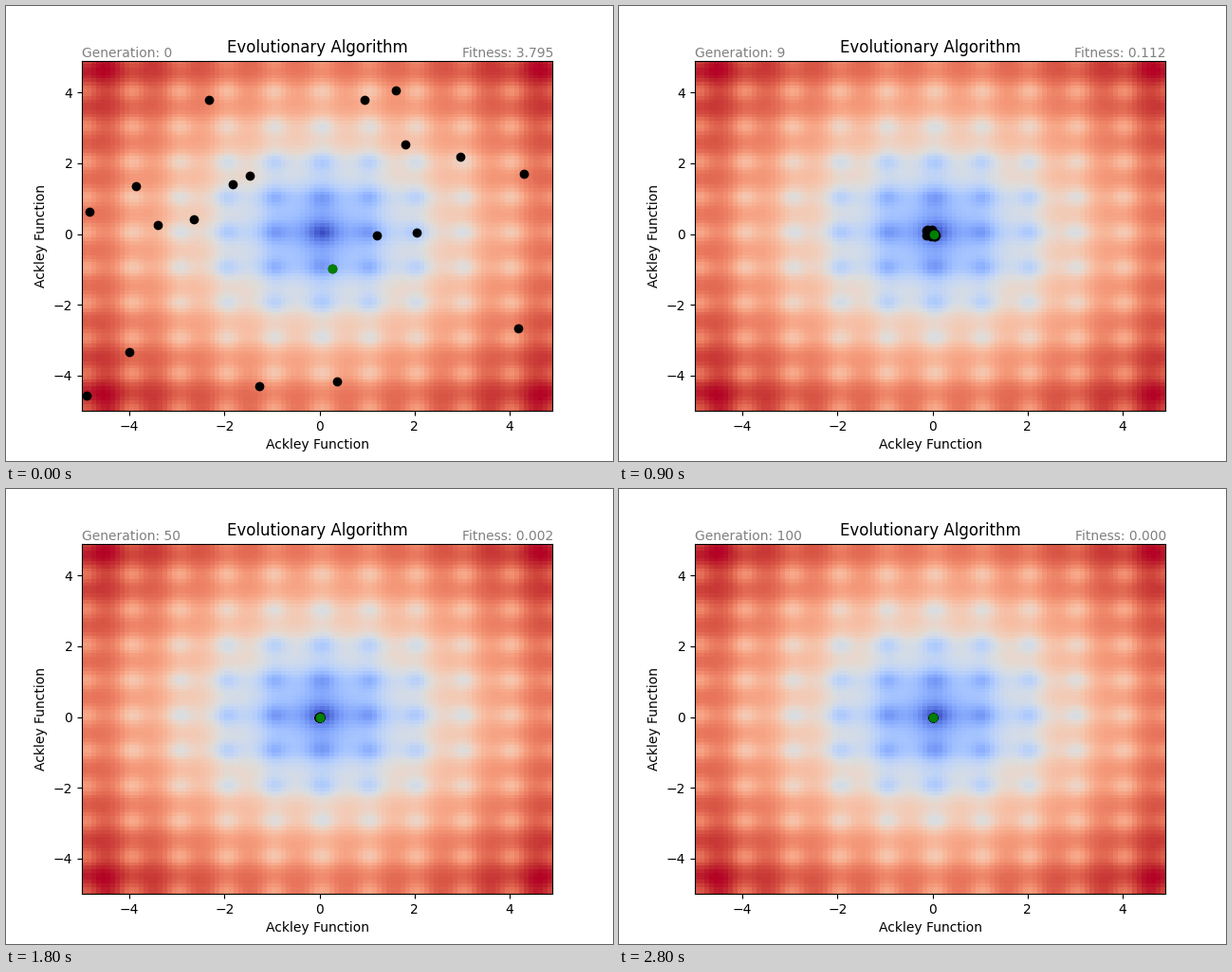
Write a matplotlib script that moves like this. It is 640 px wide and 480 px high and loops after 2900 ms.

```python
import numpy as np
import matplotlib.pyplot as plt
from matplotlib.animation import FuncAnimation

FRAMES = 29
LOW, HIGH = -5, 4.9

# Scattered first population; the last point is the fittest.
START = np.array([
    (-2.32, 3.79), (0.95, 3.79), (1.61, 4.05), (1.81, 2.53), (2.97, 2.18),
    (4.31, 1.70), (-4.84, 0.63), (-3.86, 1.35), (-3.40, 0.25), (-2.64, 0.41),
    (-1.82, 1.41), (-1.46, 1.65), (1.21, -0.04), (2.05, 0.04), (-4.00, -3.34),
    (-4.90, -4.57), (-1.26, -4.30), (0.37, -4.17), (4.19, -2.67), (0.27, -0.98),
])


def ackley(x, y):
    dist = np.sqrt(0.5 * (x**2 + y**2))
    waves = 0.5 * (np.cos(2 * np.pi * x) + np.cos(2 * np.pi * y))
    return 20 - 20 * np.exp(-0.2 * dist) + np.e - np.exp(waves)


def generation(frame):
    """Every generation up to 10, then every fifth one."""
    return frame if frame < 10 else 10 + 5 * (frame - 10)


def best_fitness(gen):
    """Falls exponentially, at a rate that changes at a few key points."""
    gens = [0, 3, 9, 35, 60, 100]
    values = [3.795, 0.428, 0.112, 0.005, 0.001, 0.0001]
    return np.exp(np.interp(gen, gens, np.log(values)))


def population(gen):
    """A cloud that closes in on the minimum as the fitness improves."""
    if gen == 0:
        return START
    fitness = best_fitness(gen)
    rng = np.random.default_rng(gen)
    noise = np.clip(rng.normal(size=START.shape), -1.8, 1.8)
    points = 0.6 * fitness * noise
    if gen <= 3:
        points[0] = START[-1]  # the first winner survives for a while
    angle = np.pi * (gen - 9) / 7
    points[-1] = fitness / 4 * np.array([np.cos(angle), np.sin(angle)])
    return points


fig, ax = plt.subplots(figsize=(6.4, 4.8), dpi=100)
axis = np.linspace(LOW, HIGH, 100)
X, Y = np.meshgrid(axis, axis)
Z = ackley(X, Y)
ax.pcolormesh(X, Y, Z[:-1, :-1], cmap="coolwarm", shading="flat",
              vmin=Z.min(), vmax=Z.max())
ax.set(xlim=(LOW, HIGH), ylim=(LOW, HIGH), title="Evolutionary Algorithm",
       xlabel="Ackley Function", ylabel="Ackley Function")

everyone, = ax.plot([], [], "o", color="black")
fittest, = ax.plot([], [], "o", color="green")
gen_text = ax.text(0, 1.01, "", color="gray", transform=ax.transAxes)
fit_text = ax.text(1.002, 1.01, "", color="gray", ha="right",
                   transform=ax.transAxes)


def update(frame):
    gen = generation(frame)
    points = population(gen)
    everyone.set_data(*points.T)
    fittest.set_data(*points[-1:].T)
    gen_text.set_text(f"Generation: {gen}")
    fit_text.set_text(f"Fitness: {best_fitness(gen):.3f}")
    return everyone, fittest, gen_text, fit_text


anim = FuncAnimation(fig, update, frames=FRAMES, interval=100, repeat=True,
                     repeat_delay=0)
plt.show()
```
